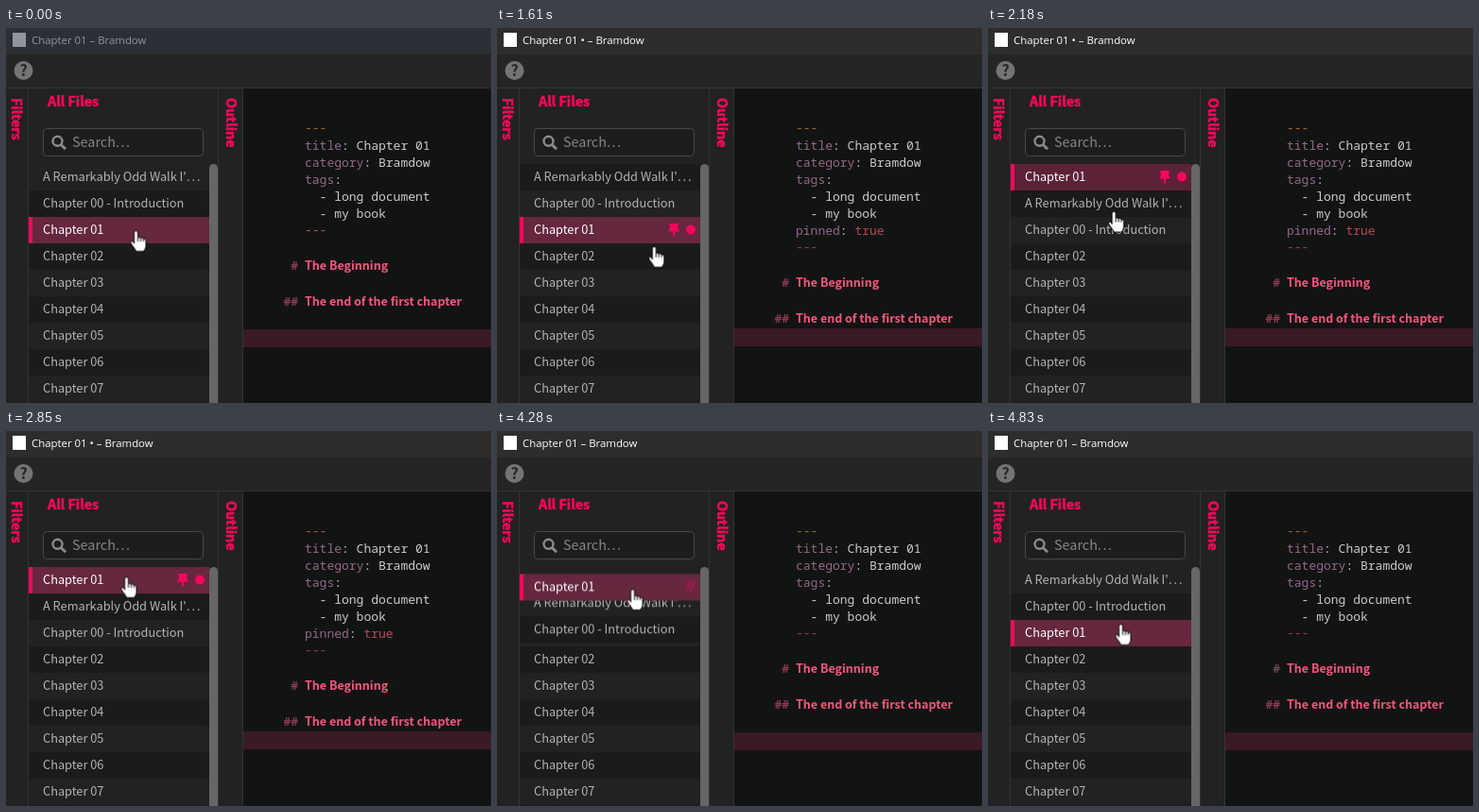
Write an HTML page that moves like this. It is 513x397 px and loops after 4860 ms.

```html
<!DOCTYPE html>
<html lang="en">
<head>
<meta charset="utf-8">
<title>Pinning a file</title>
<style>
  html, body { margin: 0; width: 100%; height: 100%; overflow: hidden; background: #222; }
  svg { display: block; width: 513px; height: 397px; }

  /* Type */
  text { white-space: pre; }
  .ui { font: 12.78px 'Noto Sans CJK JP', 'Noto Sans CJK SC', 'Noto Sans CJK', sans-serif; fill: #b4b4b4; }
  .sys { font: 11.4px 'Open Sans', 'Noto Sans', sans-serif; fill: #fff; }
  .code { font: 500 13px 'Noto Sans Mono', 'DejaVu Sans Mono', monospace; fill: #c8ccd0; }
  .head { font-size: 14.3px; font-weight: 700; fill: #f5085b; stroke: #f5085b; stroke-width: .6px; }
  .title { font-size: 12.5px; font-weight: 700; fill: #f7557e; }
  .current { font-weight: 500; fill: #fff; }
  .search { font-size: 14.4px; fill: #858585; }
  .help { font-size: 16px; font-weight: 900; fill: #252525; text-anchor: middle; }
  .hash { font-weight: 700; fill: #8d3a50; text-anchor: end; }
  .key { fill: #94678a; }
  .fence { fill: #a8672e; }
  .off { fill: #84868e; }
  .pink { fill: #f5085b; }
  .dark { fill: #1b1b1b; }

  /* Timeline: one loop is 4860 ms, so 1% is 48.6 ms */
  .step, .move { animation: 4860ms infinite; }
  .step { animation-timing-function: step-end; }
  .move { animation-timing-function: ease; }

  .focusbar { animation-name: focusbar; }
  .focustext { animation-name: focustext; }
  .edited { animation-name: edited; }
  .clean { animation-name: clean; }
  .shift { animation-name: shift; }
  .band { animation-name: band; }
  .endfence { animation-name: endfence; }
  .toDark { animation-name: toDark; }
  .toLight { animation-name: toLight; }
  .selected { animation-name: selected; }
  .up { animation-name: up; }
  .down { animation-name: down; }
  .pin { animation-name: pin; }
  .menu1 { animation-name: menu1; }
  .menu2 { animation-name: menu2; }
  .hover1 { animation-name: hover1; }
  .hover2 { animation-name: hover2; }
  .arrow { animation-name: arrow; }
  .hand { animation-name: hand; }
  .pointer { animation-name: pointer; animation-timing-function: ease-in-out; }

  @keyframes focusbar { 0% { fill: #2c2f35; } 4.1%, 100% { fill: #2f2d2c; } }
  @keyframes focustext { 0% { fill: #92959a; } 4.1%, 100% { fill: #fff; } }
  @keyframes edited { 0% { opacity: 0; } 32% { opacity: 1; } 86.4%, 100% { opacity: 0; } }
  @keyframes clean { 0% { opacity: 1; } 32% { opacity: 0; } 86.4%, 100% { opacity: 1; } }
  @keyframes shift { 0% { transform: none; } 32% { transform: translateY(18px); } 86.4%, 100% { transform: none; } }
  @keyframes band { 0% { transform: none; } 32% { transform: translateY(-1px); } 86.4%, 100% { transform: none; } }
  @keyframes endfence { 0% { fill: #a8672e; } 32%, 100% { fill: #a83a48; } }
  @keyframes toDark { 0% { fill: #222; } 32% { fill: #1b1b1b; } 86.9%, 100% { fill: #222; } }
  @keyframes toLight { 0% { fill: #1b1b1b; } 32% { fill: #222; } 86.9%, 100% { fill: #1b1b1b; } }
  @keyframes selected { 0% { fill: #66273f; } 33.9% { fill: #5c2238; } 49%, 100% { fill: #66273f; } }
  @keyframes up {
    0%, 33.87% { transform: none; }
    43.13%, 86.95% { transform: translateY(-56px); }
    96.21%, 100% { transform: none; }
  }
  @keyframes down {
    0%, 33.87% { transform: none; }
    43.13%, 86.95% { transform: translateY(28px); }
    96.21%, 100% { transform: none; }
  }
  @keyframes pin {
    0%, 32% { opacity: 0; transform: none; }
    33.5%, 86.39% { opacity: 1; transform: none; }
    86.4% { opacity: 1; transform: translateX(18px); }
    90.5%, 100% { opacity: 0; transform: translateX(18px); }
  }
  @keyframes menu1 { 0% { opacity: 0; } 20.97% { opacity: 1; } 31.26%, 100% { opacity: 0; } }
  @keyframes menu2 { 0% { opacity: 0; } 68.5% { opacity: 1; } 85%, 100% { opacity: 0; } }
  @keyframes hover1 { 0% { opacity: 0; } 23.6%, 100% { opacity: 1; } }
  @keyframes hover2 { 0% { opacity: 0; } 79.8%, 100% { opacity: 1; } }
  @keyframes arrow {
    0% { opacity: 0; } 20.97% { opacity: 1; } 31.26% { opacity: 0; }
    68.5% { opacity: 1; } 85%, 100% { opacity: 0; }
  }
  @keyframes hand {
    0% { opacity: 1; } 20.97% { opacity: 0; } 31.26% { opacity: 1; }
    68.5% { opacity: 0; } 85%, 100% { opacity: 1; }
  }
  @keyframes pointer {
    0%, 22.4% { transform: translate(137.5px, 214.5px); }
    26.3%, 32% { transform: translate(168px, 233px); }
    39.2%, 42.4% { transform: translate(134px, 200px); }
    52.3%, 58.7% { transform: translate(127.5px, 154.5px); }
    61.5%, 78.2% { transform: translate(127px, 153.5px); }
    82.3%, 85% { transform: translate(160px, 172px); }
    88%, 89.3% { transform: translate(143.5px, 167.5px); }
    99.3%, 100% { transform: translate(140.5px, 204.5px); }
  }
</style>
</head>
<body>
<svg viewBox="0 0 513 397">
  <defs>
    <filter id="shadow" x="-10%" y="-10%" width="125%" height="125%">
      <feDropShadow dx="2" dy="2" stdDeviation="1.5" flood-color="#000" flood-opacity=".5"/>
    </filter>
    <g id="panel">
      <rect x=".5" y=".5" width="179" height="173" fill="#292a2e" stroke="#47484c" filter="url(#shadow)"/>
      <path d="M3 57.5H177M3 116.5H177" stroke="#404145"/>
    </g>
    <rect id="hover" x="3" y="5" width="174" height="24" fill="#414246"/>
    <g id="items" class="sys">
      <text x="25" y="45">Open containing folder...</text>
      <text x="25" y="80">Save As...</text>
      <text x="25" y="104">Duplicate file</text>
      <text x="25" y="163">Delete File</text>
    </g>
  </defs>

  <!-- Window frame -->
  <rect width="513" height="397" fill="#222"/>
  <rect class="step focusbar" width="513" height="28"/>
  <rect class="step focustext" x="7" y="5" width="14" height="15"/>
  <g class="sys">
    <text class="step clean" x="27" y="17"><tspan class="step focustext">Chapter 01 – Bramdow</tspan></text>
    <text class="step edited" x="27" y="17">Chapter 01 • – Bramdow</text>
  </g>
  <rect y="28" width="513" height="36" fill="#252525"/>
  <path d="M0 63.5H513" stroke="#333"/>
  <circle cx="18.5" cy="45" r="10" fill="#747474"/>
  <text class="ui help" x="18.5" y="51">?</text>

  <!-- Sidebar -->
  <path d="M23.5 64V397M224.5 64V397" stroke="#333"/>
  <g class="ui">
    <text class="head" transform="translate(6 74) rotate(90)">Filters</text>
    <text class="head" transform="translate(233 74) rotate(90)">Outline</text>
    <text class="head" x="44" y="83">All Files</text>
    <rect x="39.5" y="106.5" width="169" height="29" rx="4" fill="#1d1d1d" stroke="#484848"/>
    <g fill="none" stroke="#8a8a8a" stroke-width="2.4">
      <circle cx="54.5" cy="119.8" r="5"/>
      <path d="M58.2 123.5L63 128.3" stroke-width="3"/>
    </g>
    <text class="search" x="70" y="126">Search<tspan letter-spacing="1.6">...</tspan></text>

    <path class="dark" d="M24 228h191v28h-191zM24 284h191v28h-191zM24 340h191v28h-191zM24 396h191v1h-191z"/>
    <text x="39" y="246">Chapter 02</text>
    <text x="39" y="274">Chapter 03</text>
    <text x="39" y="302">Chapter 04</text>
    <text x="39" y="330">Chapter 05</text>
    <text x="39" y="358">Chapter 06</text>
    <text x="39" y="386">Chapter 07</text>

    <g class="move down">
      <rect class="step toDark" x="24" y="144" width="191" height="28"/>
      <text x="39" y="162">A Remarkably Odd Walk I'<tspan letter-spacing="2">...</tspan></text>
      <rect class="step toLight" x="24" y="172" width="191" height="28"/>
      <text x="39" y="190">Chapter 00 - Introduction</text>
    </g>
    <g class="move up">
      <rect class="step selected" x="24" y="200" width="191" height="28"/>
      <rect class="pink" x="24" y="200" width="4" height="28"/>
      <text class="current" x="39" y="218">Chapter 01</text>
      <g class="move pin">
        <path class="pink" transform="translate(181 207)" d="M1 0h10v2h-1l.5 4.2c1 .5 1.5 1.4 1.5 2.3H7v4L6 14l-1-1.5v-4H0c0-1 .5-1.8 1.5-2.3L2 2H1z"/>
      </g>
      <circle class="pink step edited" cx="205" cy="213.5" r="5"/>
    </g>
  </g>
  <path d="M215 397V148.5a4.5 4.5 0 0 1 9 0V397z" fill="#666"/>

  <!-- Editor -->
  <rect x="251" y="64" width="262" height="333" fill="#121413"/>
  <path d="M250.5 64V397" stroke="#333"/>
  <rect class="step band" x="251" y="319" width="262" height="19" fill="#3a1a25"/>
  <g class="code">
    <text class="fence" x="316" y="110">---</text>
    <text x="316" y="129"><tspan class="key">title</tspan>: Chapter 01</text>
    <text x="316" y="147"><tspan class="key">category</tspan>: Bramdow</text>
    <text x="316" y="165"><tspan class="key">tags</tspan>:</text>
    <text x="331.6" y="183">- long document</text>
    <text x="331.6" y="201">- my book</text>
    <text class="step edited" x="316" y="219"><tspan class="key">pinned</tspan>: <tspan fill="#b8485c">true</tspan></text>
    <g class="step shift">
      <text class="step endfence" x="316" y="218">---</text>
      <text class="hash" x="309" y="256">#</text>
      <text class="hash" x="309" y="294">##</text>
      <g class="ui">
        <text class="title" x="316" y="256">The Beginning</text>
        <text class="title" x="316" y="294">The end of the first chapter</text>
      </g>
    </g>
  </g>

  <!-- Context menus -->
  <g class="step menu1"><g class="sys" transform="translate(137 215)">
    <use href="#panel"/>
    <use href="#hover" class="step hover1"/>
    <text x="25" y="21">Pin file</text>
    <use href="#items"/>
    <text class="off" x="25" y="139">Revert File</text>
  </g></g>
  <g class="step menu2"><g class="sys" transform="translate(127 154)">
    <use href="#panel"/>
    <use href="#hover" class="step hover2"/>
    <text x="25" y="21">Unpin file</text>
    <use href="#items"/>
    <text x="25" y="139">Revert File</text>
  </g></g>

  <!-- Pointer, drawn around its hot spot -->
  <g class="move pointer" fill="#fff" stroke="#000" stroke-linejoin="round">
    <path class="step arrow" d="M0 0V17l4-4 2.6 6 2.6-1.1-2.6-5.9h5.6z"/>
    <g class="step hand">
      <path d="M-2 13.5V2a2 2 0 0 1 4 0v5.5a1.8 1.8 0 0 1 3 .6a1.8 1.8 0 0 1 3 .8a1.8 1.8 0 0 1 2.6 1.6V16c0 3-2 4.5-2.2 6H-.2C-.5 19.5-4 16-5.4 13.4c-1-2 1-3.2 2.2-1.9z"/>
      <path d="M2 7.5v4M5 8.1v3.4M8 8.9v2.6" fill="none"/>
    </g>
  </g>
</svg>
</body>
</html>
```
